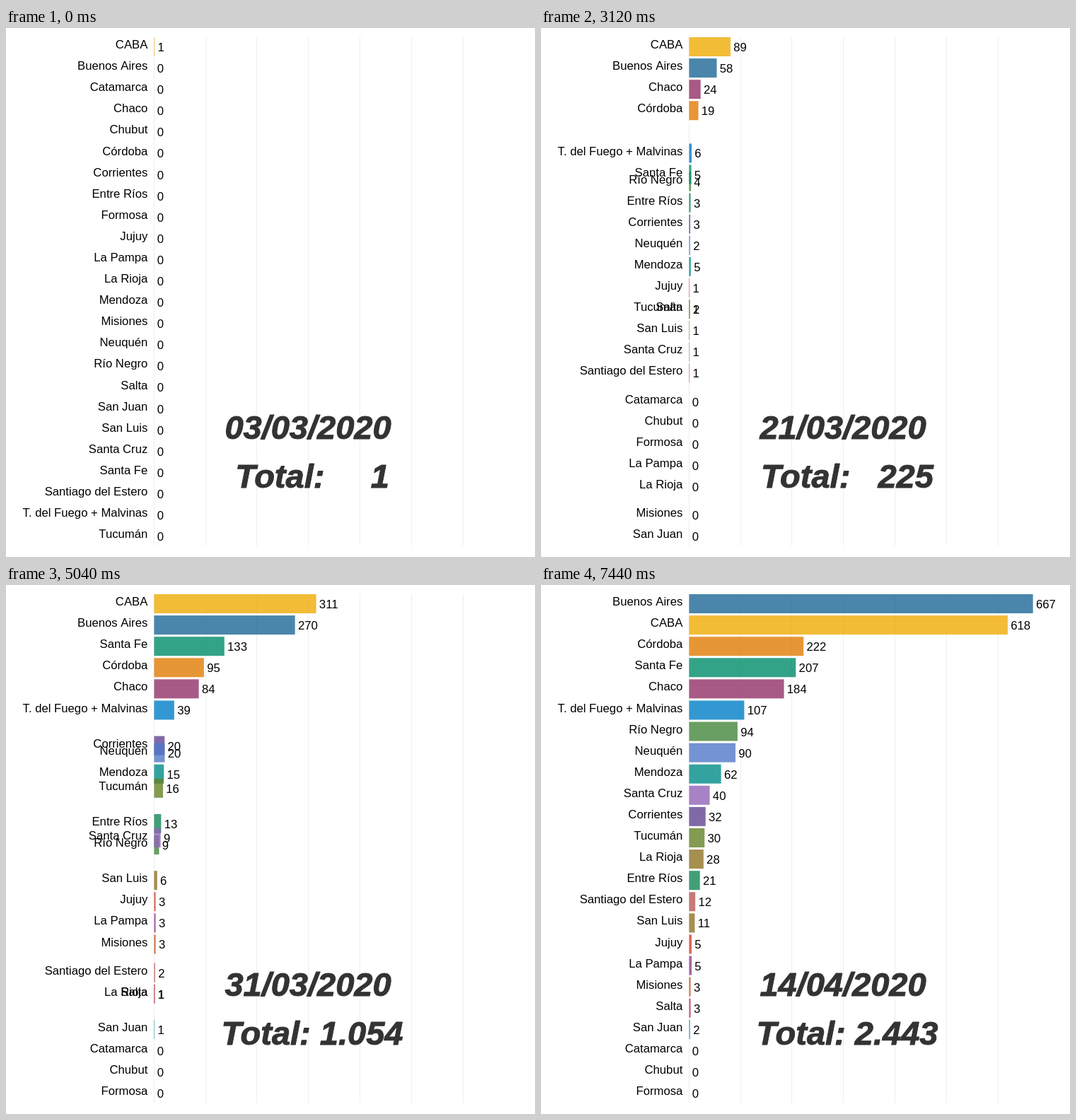
Recreate the animation shown at these times as an HTML page with a canvas. Size 748 by 748 pixels, loop 8000 ms.

```html
<!DOCTYPE html>
<html lang="es">
<head>
<meta charset="utf-8">
<style>
  html, body { margin: 0; width: 100%; height: 100%; overflow: hidden; background: #fff; }
  canvas { display: block; }
</style>
</head>
<body>
<canvas id="stage" width="748" height="748"></canvas>
<script>
const ctx = document.getElementById('stage').getContext('2d');
const FONT = '"Liberation Sans", Arial, sans-serif';
const LOOP = 8000, TICK = 60;
const X0 = 209.4, UNIT = 0.729, TOP = 13, PITCH = 30.09, BAR = 27;

// Report days with known counts; rows below are right-aligned to these,
// "." means interpolate, missing leading values mean zero.
const KEYS = [0, 1, 2, 6, 10, 11, 16, 17, 23, 25, 27, 28, 33, 37, 41];
const LAST = 41;
const PROVINCES = [
  ['CABA', '#efac05', '1 2 5 11 20 24 63 89 236 . 311 321 456 548 618'],
  ['Buenos Aires', '#1d6896', '2 3 9 10 45 58 194 . 270 280 409 490 667'],
  ['Catamarca', '#888', '0'],
  ['Chaco', '#93316a', '2 8 11 19 24 62 . 84 92 119 . 184'],
  ['Chubut', '#888', '0'],
  ['Córdoba', '#e27c04', '1 1 4 4 16 19 60 . 95 100 146 . 222'],
  ['Corrientes', '#604592', '1 3 5 . 20 21 24 . 32'],
  ['Entre Ríos', '#128655', '3 3 9 . 13 15 19 . 21'],
  ['Formosa', '#888', '0'],
  ['Jujuy', '#d04633', '1 1 3 . 3 3 5 . 5'],
  ['La Pampa', '#934090', '1 . 3 3 3 . 5'],
  ['La Rioja', '#907323', '1 1 9 . 28'],
  ['Mendoza', '#008c87', '5 8 . 15 27 30 . 62'],
  ['Misiones', '#c35922', '2 . 3 3 3 . 3'],
  ['Neuquén', '#5078c9', '2 2 11 . 20 22 50 84 90'],
  ['Río Negro', '#45873d', '1 1 1 3 4 7 . 9 11 19 . 94'],
  ['Salta', '#ba385e', '1 1 1 . 1 3 3 . 3'],
  ['San Juan', '#2995af', '1 1 1 1 . 2'],
  ['San Luis', '#907323', '1 1 1 1 1 6 . 6 6 11 . 11'],
  ['Santa Cruz', '#9265b8', '1 1 9 . 9 20 23 . 40'],
  ['Santa Fe', '#018c69', '2 2 3 5 64 . 133 143 184 . 207'],
  ['Santiago del Estero', '#ba5854', '1 1 2 . 2 2 9 . 12'],
  ['T. del Fuego + Malvinas', '#007fc7', '2 3 6 14 . 39 39 77 83 107'],
  ['Tucumán', '#648229', '1 2 15 . 16 20 27 . 30'],
];

// Time in ms against report day
const CLOCK = [[0, 0], [60, 0], [180, 2 / 3], [240, 1], [360, 1], [420, 5 / 3],
  [4260, 23], [5040, 27 + 1 / 3], [6000, 33], [7440, 41], [LOOP, 41]];

const lerp = (a, b, k) => a + (b - a) * k;

function along(points, x) {
  const i = Math.max(1, points.findIndex(p => p[0] >= x));
  const [x0, y0] = points[i - 1], [x1, y1] = points[i];
  return lerp(y0, y1, (x - x0) / (x1 - x0));
}

function series(row) {
  const cells = row.split(' ');
  const skip = KEYS.length - cells.length;
  const points = KEYS
    .map((day, i) => [day, i < skip ? 0 : cells[i - skip]])
    .filter(p => p[1] !== '.')
    .map(([day, n]) => [day, +n]);
  return Array.from({ length: LAST + 1 }, (_, day) => Math.floor(along(points, day) + 1e-6));
}

const counts = PROVINCES.map(p => series(p[2]));

// ranks[day][province]: by count, ties keep the list order
const ranks = Array.from({ length: LAST + 1 }, (_, day) => {
  const rank = [];
  counts.map((_, i) => i)
    .sort((a, b) => counts[b][day] - counts[a][day] || a - b)
    .forEach((p, i) => rank[p] = i);
  return rank;
});

function text(str, x, y, align, font, color) {
  ctx.font = font + ' ' + FONT;
  ctx.textAlign = align;
  ctx.fillStyle = color;
  ctx.fillText(str, x, y);
}

// Large caption, thickened by a thin outline
function caption(str, x, y) {
  text(str, x, y, 'center', 'italic bold 47px', '#333');
  ctx.strokeStyle = '#333';
  ctx.lineWidth = 1;
  ctx.lineJoin = 'round';
  ctx.strokeText(str, x, y);
}

function dateText(day) {
  // no report was issued on the second day
  const d = new Date(2020, 2, 3 + day + (day > 0 ? 1 : 0));
  const two = n => String(n).padStart(2, '0');
  return `${two(d.getDate())}/${two(d.getMonth() + 1)}/2020`;
}

function draw(ms) {
  const pos = along(CLOCK, ms);
  const from = Math.floor(pos + 1e-6), to = Math.min(from + 1, LAST);
  const k = Math.max(0, pos - from), shown = Math.round(pos);

  ctx.fillStyle = '#fff';
  ctx.fillRect(0, 0, 748, 748);
  ctx.fillStyle = '#eee';
  for (let i = 0; i < 7; i++) ctx.fillRect(Math.round(208.6 + i * 72.9), TOP, 1, 719);

  const bars = PROVINCES.map(([name, color], i) => ({
    name, color,
    count: counts[i][shown],
    w: lerp(counts[i][from], counts[i][to], k) * UNIT,
    y: TOP + PITCH * lerp(ranks[from][i], ranks[to][i], k),
  }));

  ctx.globalAlpha = 0.8;
  for (const b of bars) {
    ctx.fillStyle = b.color;
    ctx.fillRect(X0, b.y, b.w, BAR);
  }
  ctx.globalAlpha = 1;
  for (const b of bars) {
    text(b.name, 200.3, b.y + 16.1, 'right', '16.7px', '#000');
    text(b.count, X0 + b.w + 4.3, b.y + 20, 'left', '16.7px', '#000');
  }

  const total = String(bars.reduce((sum, b) => sum + b.count, 0))
    .replace(/(\d)(\d{3})$/, '$1.$2');
  caption(dateText(shown), 427, 581);
  caption('Total: ' + total.padStart(5), 433, 650);
}

function frame() {
  const ms = performance.now() % LOOP;
  draw(Math.floor(ms / TICK) * TICK);
  requestAnimationFrame(frame);
}
frame();
</script>
</body>
</html>
```
